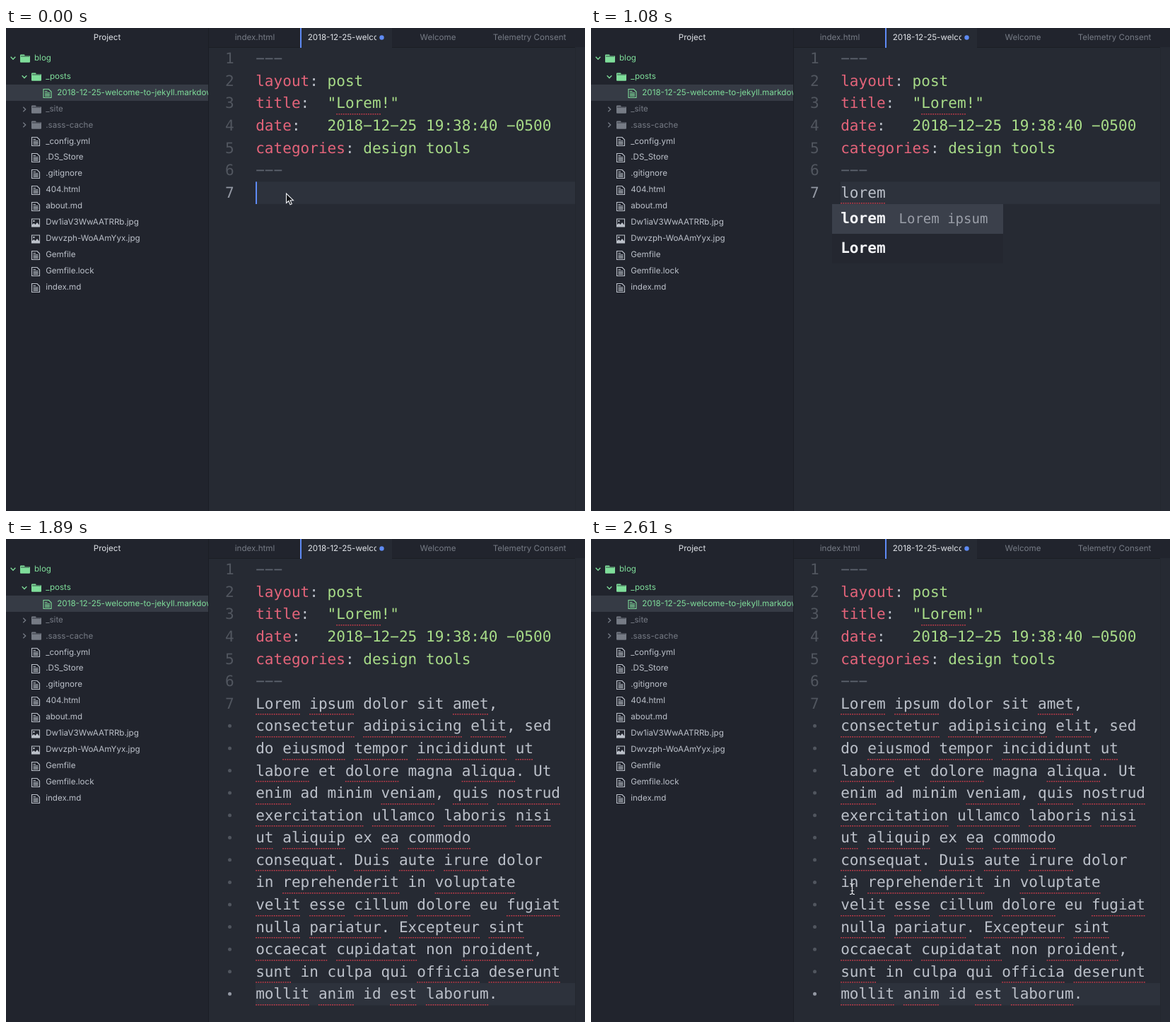
An HTML page with a canvas for the animation above (2640 ms loop, 819x683 px).

```html
<!DOCTYPE html>
<html lang="en">
<head>
<meta charset="utf-8">
<title>Editor snippet</title>
<style>
  html, body { margin: 0; width: 100%; height: 100%; overflow: hidden; background: #262a33; }
  canvas { display: block; }
</style>
</head>
<body>
<canvas id="stage" width="819" height="683"></canvas>
<script>
const ctx = document.getElementById('stage').getContext('2d');
ctx.textRendering = 'geometricPrecision';
const LOOP = 2640, BLINK = 310;
const EXPAND = 1560, SPELL = 1680;
const TYPED = [[0, ''], [270, 'l'], [390, 'lo'], [480, 'lor'], [570, 'lore'], [660, 'lorem']];

const UI = '11.6px Inter, "Open Sans", sans-serif';
const mono = (size, weight = 'normal') => `${weight} ${size}px "DejaVu Sans Mono", monospace`;
const SIZE = 21.05, CHAR = SIZE * 0.602, CODE = mono(SIZE), CODE_X = 353.2, ROW = 31.58;
const C = {
  side: '#21242d', editor: '#262a33', edge: '#1b1e25', line: '#2d323c', select: '#363b45',
  text: '#bcc1ca', bright: '#e0e3e8', dim: '#767b85', faint: '#51565f', comment: '#5e646f',
  red: '#e4647a', green: '#a8dc88', added: '#7fdd9a', blue: '#5f8bf5', spell: '#c43c4a'
};

const HEADER = [
  [['---', C.comment]],
  [['layout', C.red], [': ', C.text], ['post', C.green]],
  [['title', C.red], [':  ', C.text], ['"Lorem!"', C.green]],
  [['date', C.red], [':   ', C.text], ['2018-12-25 19:38:40 -0500', C.green]],
  [['categories', C.red], [': ', C.text], ['design tools', C.green]],
  [['---', C.comment]]
];
const LOREM = `Lorem ipsum dolor sit amet,
consectetur adipisicing elit, sed
do eiusmod tempor incididunt ut
labore et dolore magna aliqua. Ut
enim ad minim veniam, quis nostrud
exercitation ullamco laboris nisi
ut aliquip ex ea commodo
consequat. Duis aute irure dolor
in reprehenderit in voluptate
velit esse cillum dolore eu fugiat
nulla pariatur. Excepteur sint
occaecat cupidatat non proident,
sunt in culpa qui officia deserunt
mollit anim id est laborum.`.split('\n');
const KNOWN = new Set('dolor sit sed do et magna Ut ad minim ex in eu non culpa qui id'.split(' '));

const FILES = [
  ['_posts', 'open'], ['2018-12-25-welcome-to-jekyll.markdown', 'post'],
  ['_site', 'closed'], ['.sass-cache', 'closed'],
  ['_config.yml'], ['.DS_Store'], ['.gitignore'], ['404.html'], ['about.md'],
  ['Dw1iaV3WwAATRRb.jpg', 'image'], ['Dwvzph-WoAAmYyx.jpg', 'image'],
  ['Gemfile'], ['Gemfile.lock'], ['index.md']
];

function rect(x, y, w, h, color) {
  ctx.fillStyle = color;
  ctx.fillRect(x, y, w, h);
}

function text(str, x, y, color, font = UI, align = 'left') {
  ctx.font = font;
  ctx.textAlign = align;
  ctx.fillStyle = color;
  ctx.fillText(str, x, y);
}

function clipped(right, draw) {
  ctx.save();
  ctx.beginPath();
  ctx.rect(0, 0, right, 683);
  ctx.clip();
  draw();
  ctx.restore();
}

function stroke(path, x, y, color, width = 1) {
  ctx.save();
  ctx.translate(x, y);
  ctx.strokeStyle = color;
  ctx.lineWidth = width;
  ctx.stroke(new Path2D(path));
  ctx.restore();
}

function dot(x, y, r, color) {
  ctx.fillStyle = color;
  ctx.beginPath();
  ctx.arc(x, y, r, 0, 7);
  ctx.fill();
}

const rowTop = i => 27.9 + ROW * i;
const baseline = i => rowTop(i) + 22.4;
// The wide dash matches the look of the editor font.
const code = (str, col, row, color) =>
  text(str.replace(/-/g, '\u2212'), CODE_X + col * CHAR, baseline(row), color, CODE);

function misspell(col, length, row) {
  const x = CODE_X + col * CHAR, y = Math.round(rowTop(row) + 30);
  for (let d = 0; d < length * CHAR - 1; d += 3.2) rect(x + d, y, 1.8, 1.5, C.spell);
}

function folder(x, y, color) {
  ctx.fillStyle = color;
  ctx.beginPath();
  ctx.roundRect(x, y - 5.5, 6.5, 4, 1);
  ctx.roundRect(x, y - 3.8, 14, 9.6, 1);
  ctx.fill();
  rect(x + 1, y - 3.4, 12, 0.8, C.side);
}

function page(x, y, color) {
  stroke('M.5 -5.5H8L11.5 -2V6.5H.5Z M2.5 -2.5H6 M2.5 -.3H9.5 M2.5 1.9H9.5 M2.5 4.1H9.5', x, y, color, 1.1);
}

function picture(x, y, color) {
  stroke('M.5 -5H11.5V6H.5Z', x, y, color, 1.1);
  dot(x + 3.4, y - 2, 1.2, color);
  ctx.fillStyle = color;
  ctx.beginPath();
  [[1, 6], [1, 3], [3.5, 1], [5.5, 3], [8, 0], [11, 3.5], [11, 6]].forEach(([a, b]) => ctx.lineTo(x + a, y + b));
  ctx.fill();
}

const chevron = (x, y, open, color) =>
  stroke(open ? 'M-3.3 -1.7L0 1.7L3.3 -1.7' : 'M-1.7 -3.3L1.7 0L-1.7 3.3', x, y, color, 1.3);

function drawTree() {
  rect(0, 0, 287, 683, C.side);
  text('Project', 143, 17.2, C.bright, UI, 'center');
  chevron(10, 42.5, true, C.added);
  folder(20, 43, C.added);
  text('blog', 40, 46, C.added);
  FILES.forEach(([name, kind], i) => {
    const y = 68 + 22.95 * i, iconY = Math.round(y + 0.6), base = y + 3.7;
    if (kind === 'post') {
      rect(0, 80, 286, 23, C.select);
      page(52.5, iconY, C.added);
      clipped(286, () => text(name, 72.3, base, C.added));
      return;
    }
    const isFolder = kind === 'open' || kind === 'closed';
    const color = kind === 'open' ? C.added : isFolder ? C.dim : C.text;
    if (isFolder) {
      chevron(26, iconY, kind === 'open', color);
      folder(36, iconY, color);
    } else {
      (kind === 'image' ? picture : page)(36, iconY, color);
    }
    text(name, 56.2, base, color);
  });
  rect(286, 0, 1, 683, C.edge);
}

function drawTabs() {
  rect(287, 0, 532, 27, C.side);
  rect(287, 27, 518, 1, C.edge);
  rect(417, 0, 129, 28, C.editor);
  rect(416, 0, 2, 28, C.blue);
  text('index.html', 352, 17.2, C.dim, UI, 'center');
  clipped(524, () => text('2018-12-25-welcome', 426.8, 17.2, C.bright));
  dot(531.5, 13.5, 3.2, C.blue);
  text('Welcome', 611, 17.2, C.dim, UI, 'center');
  text('Telemetry Consent', 740.5, 17.2, C.dim, UI, 'center');
}

function drawPopup(prefix) {
  const items = prefix === 'l'
    ? [['l', 'link'], ['legal', 'Copyright Notice'], ['lorem', 'Lorem ipsum']]
    : [['lorem', 'Lorem ipsum'], ['Lorem', '']];
  const width = prefix === 'l' ? 298 : 242, x = 341, y = 249, step = 42;
  rect(x, y, width, items.length * step, '#242730');
  rect(x, y, width, step, '#3b404b');
  items.forEach(([word, note], i) => {
    const base = y + 27 + i * step, n = prefix.length;
    text(word.slice(0, n), CODE_X, base, '#f4f5f8', mono(SIZE, 'bold'));
    text(word.slice(n), CODE_X + n * CHAR, base, '#c3c7cf', CODE);
    text(note, 435.5, base, i ? '#6d727d' : '#9a9ea8', mono(19));
  });
}

function drawEditor(t) {
  const expanded = t >= EXPAND;
  const [since, typed] = TYPED.filter(([at]) => t >= at).pop();
  const body = expanded ? LOREM : [typed];
  const last = 5 + body.length;
  rect(287, 0, 532, 683, C.editor);
  rect(353, rowTop(last), 452, ROW, C.line);
  rect(805, 28, 1, 655, '#23272f');

  for (let row = 0; row <= last; row++) {
    const color = row === last ? '#9499a4' : C.faint;
    if (row < 7) text(row + 1, 316.3, baseline(row), color, CODE, 'center');
    else dot(316.5, rowTop(row) + 15.4, 2.5, color);
  }
  HEADER.forEach((parts, row) => {
    let col = 0;
    for (const [str, color] of parts) {
      code(str, col, row, color);
      col += str.length;
    }
  });
  misspell(9, 5, 2);

  body.forEach((str, i) => {
    code(str, 0, 6 + i, C.text);
    if (expanded ? t < SPELL : t < 930) return;
    for (const { 0: word, index } of str.matchAll(/\w+/g))
      if (!KNOWN.has(word)) misspell(index, word.length, 6 + i);
  });

  const idle = t - (expanded ? EXPAND : since);
  if (Math.floor(idle / BLINK) % 2 === 0)
    rect(Math.round(CODE_X + body.at(-1).length * CHAR), rowTop(last), 2, ROW, C.blue);
  if (!expanded && t >= 300) drawPopup(typed);
}

function drawPointer(t) {
  if (t < 270) {
    const arrow = 'M.5 .5V14L3.7 11L6 16.2L8.3 15.2L6.1 10.2H10.4Z';
    ctx.save();
    ctx.translate(396, 233.5);
    ctx.fillStyle = '#101216';
    ctx.fill(new Path2D(arrow));
    ctx.restore();
    stroke(arrow, 396, 233.5, '#eef0f4', 1.1);
  } else if (t >= 2520) {
    stroke('M-3.5 -7.5Q0 -7.5 0 -5V5Q0 7.5 -3.5 7.5 M3.5 -7.5Q0 -7.5 0 -5 M0 5Q0 7.5 3.5 7.5 M-2 2.5H2', 369.5, 495, '#e4e6ea', 1.2);
  }
}

function frame(now) {
  const t = now % LOOP;
  drawEditor(t);
  drawTabs();
  drawTree();
  drawPointer(t);
  requestAnimationFrame(frame);
}
requestAnimationFrame(frame);
</script>
</body>
</html>
```
